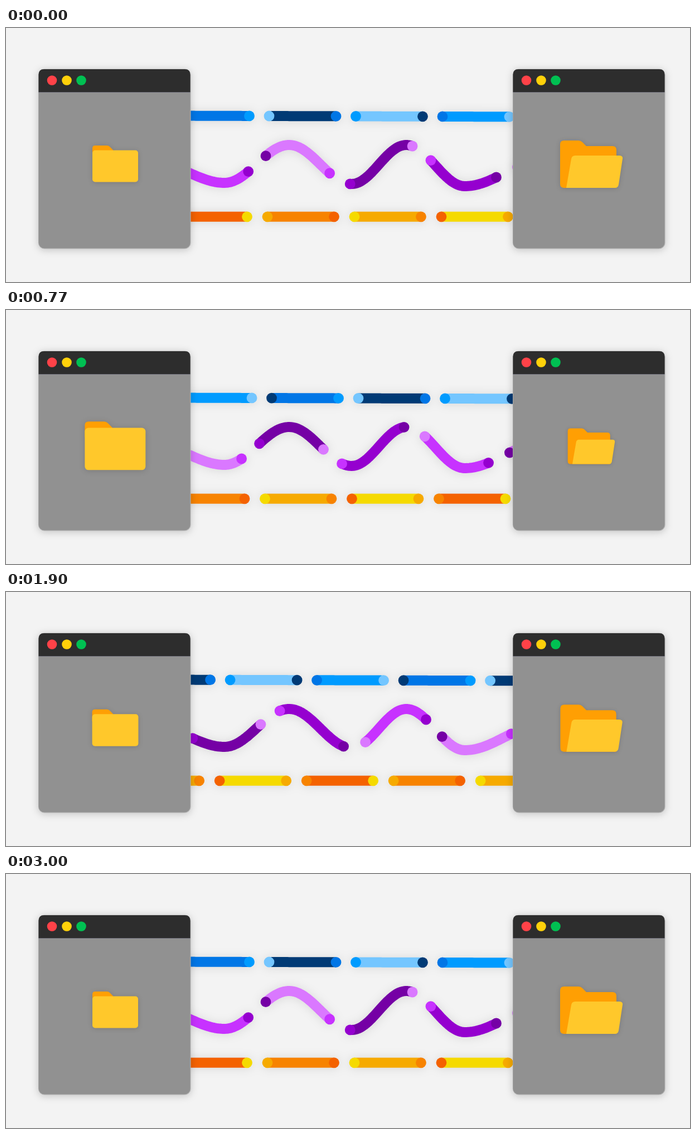
An HTML page with a canvas for the animation above (3.03 s loop, 1227x456 px).

```html
<!DOCTYPE html>
<html lang="en">
<head>
<meta charset="utf-8">
<title>Folder sync</title>
<style>
  html, body { margin: 0; width: 100%; height: 100%; overflow: hidden; background: #f3f3f3; }
  canvas, svg { position: absolute; left: 0; top: 0; }
  canvas { filter: drop-shadow(0 1px 9px rgba(0, 0, 0, .11)); }
  .win { filter: drop-shadow(0 2px 7px rgba(0, 0, 0, .2)); }
  .folder { filter: drop-shadow(0 1px 4px rgba(0, 0, 0, .16)); }
</style>
</head>
<body>
<canvas width="1227" height="456"></canvas>
<svg width="1227" height="456">
  <defs>
    <g id="win" class="win">
      <rect x="58" y="73.5" width="273.5" height="323" rx="11" fill="#b4b4b4"/>
      <rect x="58.5" y="74" width="272" height="321.5" rx="10.5" fill="#919191"/>
      <path d="M58.5 115V83.5Q58.5 74 68 74H321Q330.500 74 330.500 83.5V115Z" fill="#2d2d2d"/>
      <path d="M58.500 115.500H330.500" stroke="#74747f"/>
      <circle cx="82.500" cy="94" r="8.800" fill="#ff4248"/>
      <circle cx="109" cy="94" r="8.800" fill="#ffd10a"/>
      <circle cx="135" cy="94" r="8.800" fill="#00c052"/>
    </g>
  </defs>
  <use href="#win"/>
  <use href="#win" x="851"/>
  <g id="closed" class="folder">
    <path d="M155 216Q155 211 160 211H181Q184 211 186 213L192 219V232H155Z" fill="#ff9f03"/>
    <rect x="155" y="219.500" width="82" height="57" rx="5" fill="#ffc82b"/>
  </g>
  <g id="open" class="folder">
    <path d="M994 209Q994 202 1001 202H1027Q1031 202 1034 205L1041 212H1088Q1095 212 1095 219V287H1001Q994 287 994 280Z" fill="#ff9f03"/>
    <path d="M1014 235Q1015 229 1021 229H1100Q1107 229 1106 235L1099 281Q1098 287 1092 287H1005Z" fill="#ffc82b"/>
  </g>
</svg>
<script>
const ctx = document.querySelector('canvas').getContext('2d');
const closed = document.getElementById('closed');
const open = document.getElementById('open');
const LEFT = 270, RIGHT = 960;
const LOOP = 3030, TRAVEL = 2980, POP = 1200;
const clamp = (v, lo, hi) => Math.max(lo, Math.min(hi, v));

// Wave: half cosines between successive low and high points
const peaks = [[270, 244], [392, 278], [508, 210], [620, 280], [718, 210], [823, 284], [960, 240]];
function waveY(x) {
  let i = 1;
  while (i < peaks.length - 1 && x > peaks[i][0]) i++;
  const [x0, y0] = peaks[i - 1], [x1, y1] = peaks[i];
  return y0 + (y1 - y0) * (1 - Math.cos(Math.PI * (x - x0) / (x1 - x0))) / 2;
}

// Arc length along the wave, one entry per pixel of x
const arc = [0];
for (let x = LEFT + 1; x <= RIGHT; x++)
  arc.push(arc[arc.length - 1] + Math.hypot(1, waveY(x) - waveY(x - 1)));

function waveAt(s) {
  s = clamp(s, 0, arc[arc.length - 1]);
  let i = 1;
  while (i < arc.length - 1 && arc[i] < s) i++;
  const x = LEFT + i - 1 + (s - arc[i - 1]) / (arc[i] - arc[i - 1]);
  return [x, waveY(x)];
}

const straight = (y, slope) => s => {
  const x = clamp(s, LEFT, RIGHT);
  return [x, y + (x - 331) * slope];
};

const wires = [
  { at: straight(157.6, .003), start: 472, gap: 155.5, len: 120, shift: p => 4 * p,
    colors: ['#0076e6', '#003a75', '#74c6ff', '#009bff'] },
  { at: waveAt, start: arc[466 - LEFT], gap: 180, len: 138, shift: p => -2 * swing(p),
    colors: ['#c732ff', '#da78ff', '#7500a5', '#9500cf'] },
  { at: straight(338.8, 0), start: 469, gap: 156, len: 119.5, shift: p => -4 * p,
    colors: ['#f46200', '#f78300', '#f6aa00', '#f5da00'] }
];

const cubic = u => u < .5 ? 4 * u ** 3 : 1 - 4 * (1 - u) ** 3;
const swing = p => cubic(1 - Math.abs(1 - 2 * p));
const backOut = u => 1 + 2.70158 * (u - 1) ** 3 + 1.70158 * (u - 1) ** 2;

function dot([x, y], color) {
  ctx.fillStyle = color;
  ctx.beginPath();
  ctx.arc(x, y, 9.4, 0, 7);
  ctx.fill();
}

function drawWire({ at, start, gap, len, shift, colors }, p) {
  const color = i => colors[(i + 16) % 4];
  for (let i = -6; i < 11; i++) {
    const from = start + (i - 1 + shift(p)) * gap, to = from + len;
    ctx.strokeStyle = color(i);
    ctx.beginPath();
    for (let s = from; s < to; s += 3) ctx.lineTo(...at(s));
    ctx.lineTo(...at(to));
    ctx.stroke();
    dot(at(from), color(i + 1));
    dot(at(to), color(i - 1));
  }
}

function scale(el, x, y, k) {
  el.setAttribute('transform', `translate(${x} ${y}) scale(${k}) translate(${-x} ${-y})`);
}

function draw(now) {
  // 30 pictures per second
  const t = Math.floor((now % LOOP + 3.4) * .03) / .03;
  const p = Math.min(1, t / TRAVEL);

  ctx.clearRect(0, 0, 1227, 456);
  ctx.lineWidth = 18;
  ctx.lineJoin = 'round';
  for (const wire of wires) drawWire(wire, p);

  const half = TRAVEL / 2;
  const pop = backOut(Math.min(1, t % half / POP));
  const grown = p === 1 ? 0 : t < half ? pop : 1 - pop;
  scale(closed, 196.5, 243.5, 1 + .3 * grown);
  scale(open, 1049.5, 244.5, 1 - .225 * grown);
}

function tick() {
  draw(performance.now());
  requestAnimationFrame(tick);
}
tick();
</script>
</body>
</html>
```
